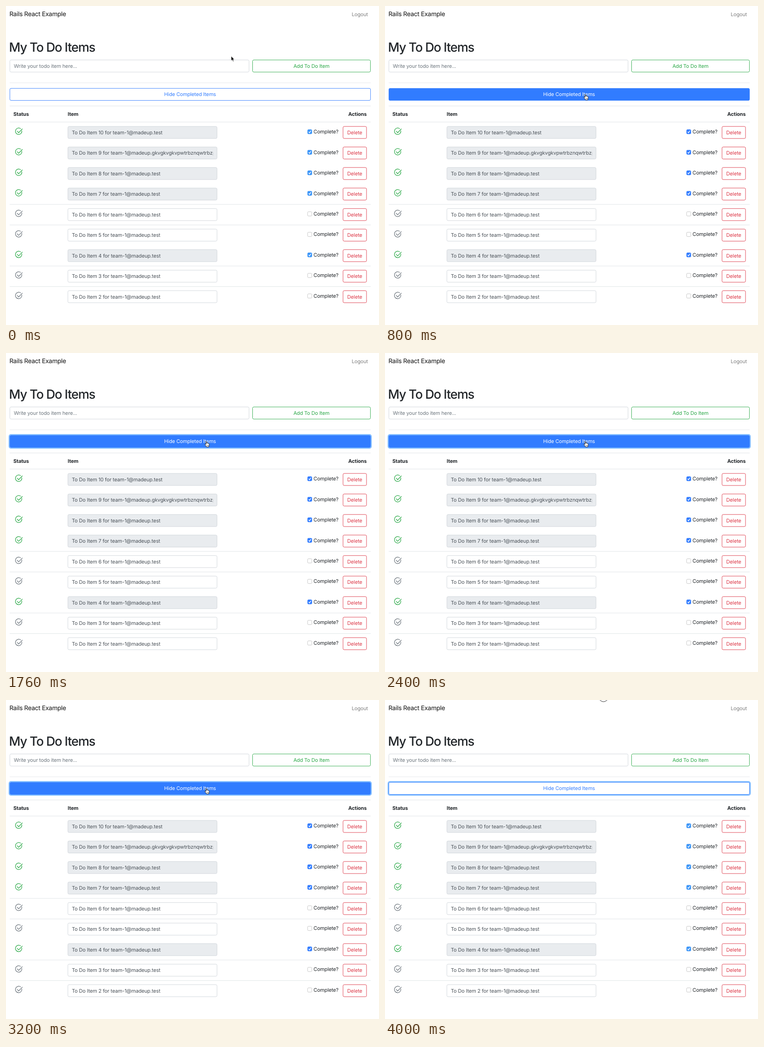
These frames come from a looping animation (810x691 px, 4160 ms). An HTML page:

```html
<!DOCTYPE html>
<html lang="en">
<head>
<meta charset="utf-8">
<title>To do items</title>
<style>
  html, body { margin: 0; width: 100%; height: 100%; overflow: hidden; background: #fff; }
  svg { display: block; width: 810px; height: 691px; }
  text {
    font: 10.9px Inter, "Liberation Sans", sans-serif;
    font-optical-sizing: none;
    letter-spacing: -.09px;
    text-rendering: geometricPrecision;
    fill: #212529;
    white-space: pre;
  }
  .brand { font-size: 13.5px; letter-spacing: -.27px; fill: #111; }
  .title { font-size: 27.3px; font-weight: 500; letter-spacing: -1.15px; }
  .head { font-weight: 700; }
  .mid { text-anchor: middle; }
  .end { text-anchor: end; }
  .muted { fill: #7f7f7f; }
  .hint { fill: #6c757d; }
  .value { fill: #495057; }
  .green { fill: #28a745; }
  .red { fill: #dc3545; }
  .box { fill: #fff; stroke: #ced4da; stroke-width: .9; }
  .done .box { fill: #e9ecef; }
  .outline { fill: #fff; stroke-width: .9; }
  .line { stroke: #dee2e6; stroke-width: .9; }
  .icon { fill: none; stroke: #6c757d; stroke-width: 1.25; stroke-linecap: round; stroke-linejoin: round; }
  .done .icon { stroke: #28a745; }
  .check { fill: #fff; stroke: #b9b9b9; stroke-width: .8; }
  .done .check { fill: var(--check); stroke: var(--check); }
  .tick { fill: none; stroke: #fff; stroke-width: 1.4; }
</style>
</head>
<body>
<svg viewBox="0 0 810 691">
  <defs>
    <clipPath id="clip"><rect x="143" y="0" width="306.5" height="40"/></clipPath>
  </defs>
  <text class="brand" x="7.5" y="22.4">Rails React Example</text>
  <text class="muted end" x="786" y="22">Logout</text>
  <text class="title" x="6.6" y="98.8">My To Do Items</text>

  <rect class="box" x="8.4" y="116.9" width="519.4" height="26.2" rx="2.6"/>
  <text class="hint" x="17" y="134">Write your todo item here...</text>
  <rect class="outline" stroke="#28a745" x="535.5" y="116.9" width="255.9" height="26.2" rx="2.6"/>
  <text class="green mid" x="663.3" y="134">Add To Do Item</text>
  <path class="line" stroke-opacity=".8" d="M8 166.4H792"/>

  <rect id="ring" x="6.9" y="176.9" width="786.2" height="29.1" rx="3.8" fill="none" stroke="#80bdff" stroke-width="2.3"/>
  <rect id="toggle" x="8.4" y="178.4" width="783.2" height="26.1" rx="2.6" stroke="#317cff" stroke-width=".9"/>
  <text id="label" class="mid" x="399.8" y="195.4"></text>

  <path class="line" d="M8 216.6H792"/>
  <text class="head" x="16" y="238">Status</text>
  <text class="head" x="134" y="238">Item</text>
  <text class="head end" x="783.3" y="238">Actions</text>
  <path class="line" stroke-width="1.4" d="M8 251.3H792"/>
  <g id="rows"></g>

  <g id="arrow">
    <path d="M0 0V10L2.3 8L3.9 11.6L5.6 10.9L4 7.4H7Z" fill="#000" stroke="#fff" stroke-width=".8"/>
  </g>
  <g id="hand">
    <path d="M2.2 1.2C2.2-.2 4-.2 4.1 1.2L4.4 4.6C5-.0 6.4 3.8 6.4 4.8C7 4 8.2 4.2 8.3 5.2C9 4.8 9.8 5.2 9.8 6.2V8.2C9.8 9.8 9 10.4 8.8 12.2H3.8C3.6 10.6 1.6 9 .5 7.2C-.1 6.2 1 5.4 1.9 6.2L2.8 7.1Z"
      fill="#fff" stroke="#111" stroke-width=".9" stroke-linejoin="round"/>
    <path d="M5 8V10.5M6.6 8V10.5M8.1 8V10.5" stroke="#222" stroke-width=".6"/>
  </g>
  <circle id="knob" cx="474.5" cy="-6" r="9.8" fill="#fff" stroke="#333" stroke-width="1"/>
</svg>
<script>
const $ = id => document.getElementById(id);
const LOOP = 4160, TOP = 251.7, PITCH = 44.47;
const finished = [10, 9, 8, 7, 4];
const mail = n => 'team-1@madeup.' + (n === 9 ? 'gkvgkvgkvpwtrbznqwtrbzpwtkzngr' : 'test');

const rowMarkup = (n, done) => `<g class="row ${done ? 'done' : ''}">
  ${done ? '' : '<path class="line" d="M8 .2H792"/>'}
  <path class="icon" d="M31.6 13.9A7 7 0 1 0 34.4 18.6M24.2 19.4L27.6 22.8L35.4 14.6"/>
  <rect class="box" x="134.4" y="9.2" width="323.8" height="26.1" rx="2.6"/>
  <text class="value" x="143" y="26.3" clip-path="url(#clip)">To Do Item ${n} for ${mail(n)}</text>
  <rect class="check" x="655" y="16.1" width="9.2" height="9.2" rx="1.8"/>
  ${done ? '<path class="tick" d="M657.2 20.8L659.1 22.9L662.2 18.4"/>' : ''}
  <text x="667.8" y="24.4">Complete?</text>
  <rect class="outline" stroke="#dc3545" x="731.9" y="9.2" width="51" height="26.1" rx="2.6"/>
  <text class="red mid" x="757.3" y="26.3">Delete</text>
</g>`;

for (let n = 10; n > 1; n--) {
  $('rows').innerHTML += rowMarkup(n, finished.includes(n));
}
const rows = [...document.querySelectorAll('.row')];

// time, pointer, x, y, button fill, focused, completed hidden
const steps = [
  [0, 'arrow', 489, 108.6, 0, 0, 0],
  [160, 'arrow', 495, 105, 0, 0, 0],
  [320, 'arrow', 477.5, 134, 0, 0, 0],
  [480, 'arrow', 431, 209, 0, 0, 0],
  [640, 'hand', 431.5, 191.2, .8, 0, 0],
  [800, 'hand', 431.5, 191.2, 1, 0, 0],
  [960, 'hand', 431.5, 191.2, 1, 1, 1],
  [1760, 'hand', 431.5, 191.2, 1, 1, 0],
  [2560, 'hand', 431.5, 191.2, 1, 1, 1],
  [3200, 'hand', 431.5, 191.2, 1, 1, 0],
  [3520, 'arrow', 450, 112, .2, 1, 0],
  [3680, 'arrow', 468, 3, 0, 1, 0],
  [3840, 'arrow', 473, -5, 0, 1, 0],
  [4000, 'knob', 0, 0, 0, 1, 0]
];

const blue = [49, 124, 255];
const tint = k => `rgb(${blue.map(c => Math.round(255 + (c - 255) * k))})`;
let shown = null;

function show([, pointer, x, y, fill, focused, hidden]) {
  for (const id of ['arrow', 'hand', 'knob']) {
    $(id).style.display = id === pointer ? '' : 'none';
  }
  if (pointer !== 'knob') $(pointer).setAttribute('transform', `translate(${x} ${y})`);
  $('ring').style.display = focused ? '' : 'none';
  $('toggle').style.fill = tint(fill);
  $('label').style.fill = tint(1 - fill);
  $('label').textContent = (hidden ? 'Show' : 'Hide') + ' Completed Items';
  $('rows').style.setProperty('--check', fill > .5 ? '#317cff' : '#3b95f8');

  let slot = 0;
  for (const row of rows) {
    const gone = hidden && row.classList.contains('done');
    row.style.display = gone ? 'none' : '';
    if (!gone) row.setAttribute('transform', `translate(0 ${TOP + PITCH * slot++})`);
  }
}

function tick() {
  const t = performance.now() % LOOP;
  const step = steps.findLast(s => s[0] <= t);
  if (step !== shown) show(shown = step);
  requestAnimationFrame(tick);
}
tick();
</script>
</body>
</html>
```
